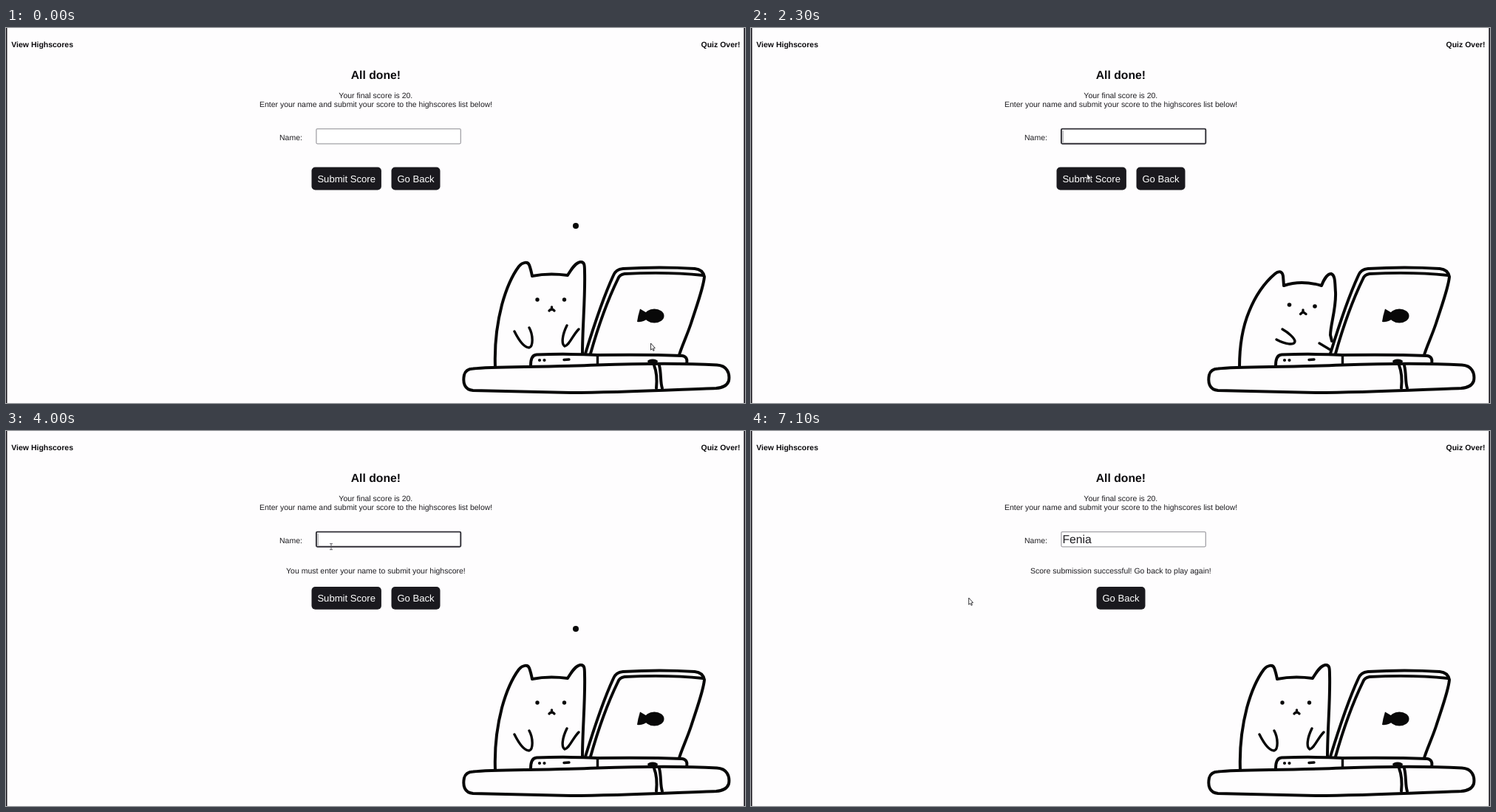
An HTML page that plays this animation: 1000x508 px, repeating every 7200 ms.

```html
<!DOCTYPE html>
<html lang="en">
<head>
<meta charset="utf-8">
<title>Quiz highscore form</title>
<style>
html, body { margin: 0; width: 100%; height: 100%; overflow: hidden; background: #fefdfe; }
svg { display: block; width: 1000px; height: 508px; }
text { font: 10.49px "Liberation Sans", Arial, sans-serif; fill: #1d1c20; text-rendering: geometricPrecision; }
.bold { font-weight: bold; fill: #0c0b0e; }
.title { font-size: 15.73px; }
.mid { text-anchor: middle; }
.end { text-anchor: end; }
.button rect { fill: #1a191e; }
.button text { font-size: 13.1px; fill: #fff; text-anchor: middle; }
#field { fill: #fff; stroke: #a4a3a8; stroke-width: 1.3; }
#field.focus { stroke: #302f36; stroke-width: 1.9; }
#typed { font-size: 15.73px; }
#caret { stroke: #77767b; stroke-width: .8; }
.ink { fill: none; stroke: #080808; stroke-width: 4; stroke-linecap: round; stroke-linejoin: round; }
.ink .paper { fill: #fefdfe; }
.ink .thin { stroke-width: 3.4; }
.ink .solid { fill: #080808; stroke: none; }
#arrow { fill: #fff; stroke: #242328; stroke-width: .9; stroke-linejoin: round; }
#beam { fill: none; stroke: #55545a; stroke-width: .9; }
</style>
</head>
<body>
<svg viewBox="0 0 1000 508">
  <rect width="1000" height="508" fill="#fefdfe"/>
  <path d="M.7 0V508M999.2 0V508" stroke="#17151b" stroke-width="1.6"/>

  <text class="bold" x="7.3" y="25.6">View Highscores</text>
  <text class="bold end" x="993.6" y="25.6">Quiz Over!</text>
  <text class="bold title mid" x="500.4" y="69.1">All done!</text>
  <text class="mid" x="500.3" y="95.3">Your final score is 20.</text>
  <text class="mid" x="500.6" y="107.4">Enter your name and submit your score to the highscores list below!</text>
  <text x="370" y="151.7">Name:</text>
  <rect id="field" x="419.9" y="136.6" width="195.4" height="20.2" rx="1.5"/>
  <text id="typed" x="421.4" y="152.2"></text>
  <path id="caret" d="M422.2 139V155"/>
  <text id="message" class="mid" x="500.4" y="192.6"></text>

  <g id="submit" class="button">
    <rect x="413.5" y="188.6" width="94.4" height="30.8" rx="5"/>
    <text x="460.7" y="208.6">Submit Score</text>
  </g>
  <g id="back" class="button">
    <rect x="521.5" y="188.6" width="66" height="30.8" rx="5"/>
    <text x="554.5" y="208.6">Go Back</text>
  </g>

  <g class="ink">
    <g id="dots" class="solid">
      <circle class="solid" cx="771" cy="268" r="4"/>
      <circle class="solid" cx="799" cy="268" r="3.9"/>
      <circle class="solid" cx="825" cy="267.6" r="3.9"/>
    </g>

    <g id="idle">
      <path d="M662 459C661 432 664 402 671 375C677 353 685 335 694 323C699 317 706 316 708 321C710 326 711 331 712 336C727 333 745 333 760 335C766 325 771 318 777 317C783 316 783 322 783 330C784 366 780 404 780 441"/>
      <path class="thin" d="M688 411C694 423 701 433 708 433C714 431 713 415 708 406M759 403C753 415 751 428 756 431C762 430 767 416 775 408"/>
      <circle class="solid" cx="719" cy="368" r="2.7"/>
      <circle class="solid" cx="755.5" cy="368" r="2.7"/>
      <path class="thin" d="M738.5 378V380M735 383L738.5 380L742 383"/>
    </g>

    <g id="busy">
      <path d="M661 459C661 435 664 408 674 384C682 364 695 345 709 333C715 328 719 330 720 336L721 349C738 343 755 344 772 349C775 341 780 333 785 333C791 335 790 346 791 358C792 380 784 402 784 416L786 424"/>
      <g class="thin">
        <path id="pawL" class="thin" d="M719 413C728 418 735 425 736 429C736 436 722 433 711 427"/>
        <path id="pawR" class="thin" d="M769 431L784 440"/>
      </g>
      <circle class="solid" cx="728.5" cy="375" r="2.8"/>
      <circle class="solid" cx="763" cy="377" r="2.8"/>
      <path class="thin" d="M747 382V384.500M743.500 387.500L747 384.500L751 387.500"/>
    </g>

    <path class="paper" d="M784 441C795 405 809 363 822 335Q825 327 835 326Q885 323 932 326Q943 327 945 337C944 351 935 375 927 400C921 418 914 432 911 443"/>
    <path d="M791 441C800 409 812 373 828 340Q830 334 837 333Q895 330 943 335"/>
    <path class="solid" d="M869 387L858 380.500Q855 390 854 398Q863 399 869 393Z"/>
    <ellipse class="solid" cx="877.3" cy="390" rx="13.2" ry="9.6"/>

    <path class="paper" d="M710 457Q710 443 718 442.500Q760 441 800 443Q870 442 915 444Q923 445 921 455"/>
    <path class="thin" d="M800.500 443V456M755 449.500L762 449"/>
    <circle class="solid" cx="722" cy="450" r="2.1"/>
    <circle class="solid" cx="728.5" cy="450" r="2.1"/>
    <path class="paper" d="M632 461.500C660 458 720 460 800 456.500Q900 453 962 456.500C975 457 980 467 978 478Q975 487 961 488C905 490 830 494 765 494C715 493 665 492 632 491C620 490 618 480 620 470Q622 462 632 461.500Z"/>
    <path d="M877 457C881 467 881 478 880 488M884 457C887 469 885 479 888 488"/>
    <ellipse class="solid" cx="875" cy="451.500" rx="7" ry="3"/>
  </g>

  <g id="pointer">
    <path id="arrow" d="M0 0V9.200L2 7.400L3.400 10.300L4.700 9.700L3.400 6.900L5.800 6.600Z"/>
    <path id="beam" d="M-2 -4H2M-2 4H2M0 -4V4"/>
  </g>
</svg>
<script>
const LOOP = 7200, CAT_LOOP = 3700, STEP = 100;
const NAME = 'Fenia';
const $ = id => document.getElementById(id);
const show = (el, on) => el.setAttribute('display', on ? 'inline' : 'none');
const move = (el, x, y) => el.setAttribute('transform', `translate(${x} ${y})`);
const within = (t, a, b) => t >= a && t < b;

// Pointer way points: time, x, y
const route = [
  [0, 872.5, 427], [100, 862, 416], [400, 720, 260], [800, 552, 158], [1000, 546, 149],
  [1700, 546, 149], [1800, 547, 166], [2100, 490, 186], [2400, 437, 203], [2600, 432, 203],
  [2700, 432, 198], [2900, 330, 192], [3100, 251, 188], [3200, 251, 188], [3500, 330, 176],
  [3800, 430, 156], [3900, 440, 156.7], [5400, 440, 156.7], [5500, 455.5, 164.7],
  [5700, 452, 200], [5800, 446, 222], [5900, 444, 225], [6100, 352, 226],
  [6200, 300, 226], [6300, 294.7, 226], [7200, 294.7, 226]
];

function pointerAt(t) {
  const i = route.findIndex(p => p[0] > t);
  const [t0, x0, y0] = route[i - 1], [t1, x1, y1] = route[i];
  const k = (t - t0) / (t1 - t0);
  return [x0 + (x1 - x0) * k, y0 + (y1 - y0) * k];
}

function drawForm(t) {
  const refused = t >= 2600, sent = t >= 5900;
  const focused = within(t, 1000, 2500) || within(t, 3900, 5900);
  const letters = t < 4300 ? 0 : Math.min(NAME.length, 1 + Math.floor((t - 4300) / 200));
  $('field').classList.toggle('focus', focused);
  $('typed').textContent = NAME.slice(0, letters);
  show($('caret'), focused && !letters);
  $('message').textContent = sent ? 'Score submission successful! Go back to play again!'
    : refused ? 'You must enter your name to submit your highscore!' : '';
  const drop = refused ? 22.4 : 0;
  show($('submit'), !sent);
  move($('submit'), 0, drop);
  move($('back'), sent ? -54 : 0, drop);
}

function drawCat(t) {
  const p = t % CAT_LOOP;
  const busy = within(p, 1900, 3100);
  show($('idle'), !busy);
  show($('busy'), busy);
  [...$('dots').children].forEach((dot, i) => show(dot, within(p, i * 600, 1900)));
  const tap = Math.floor((p - 1900) / 300) % 2 === 1;
  move($('pawL'), 0, tap ? -5 : 0);
  move($('pawR'), 0, tap ? -4 : 0);
}

function drawPointer(t) {
  const beam = within(t, 900, 1800) || within(t, 3800, 5600);
  move($('pointer'), ...pointerAt(t));
  show($('arrow'), !beam);
  show($('beam'), beam);
}

const start = performance.now();
function frame() {
  const t = Math.floor((performance.now() - start) % LOOP / STEP) * STEP;
  drawForm(t);
  drawCat(t);
  drawPointer(t);
  requestAnimationFrame(frame);
}
frame();
</script>
</body>
</html>
```
